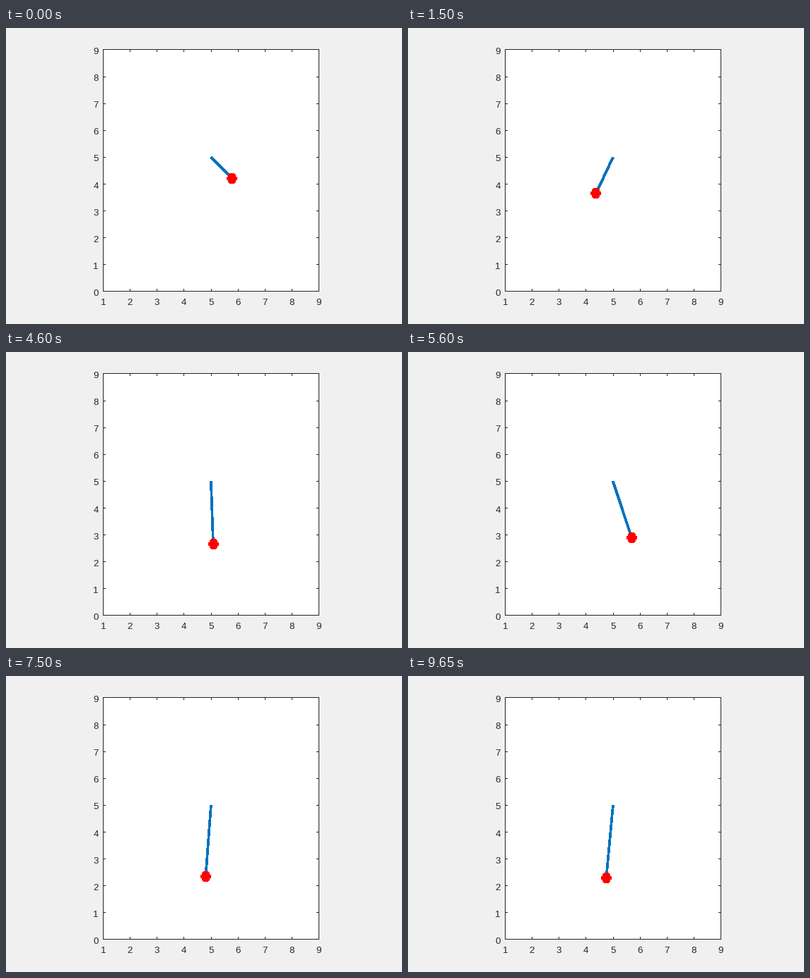
Animation of 560 by 420 pixels, one loop 9.7 s. Source, as a matplotlib script:

```python
import numpy as np
import matplotlib.pyplot as plt
from matplotlib.animation import FuncAnimation
from matplotlib.patches import Polygon, Rectangle

W, H, DPI = 560, 420, 100
PX = 72 / DPI                        # one pixel in points
FRAMES, INTERVAL = 194, 50

# Spring pendulum: unit mass, positions measured from the pivot, y downwards
G, K, REST = 9.81, 10.0, 1.0
START_LEN, START_ANGLE = 1.1, np.pi / 4
STEP, SUBSTEPS = 0.06013, 12

# Pixel columns and rows of the box outline
LEFT, RIGHT, TOP, BOTTOM = 137, 442, 30, 373
TICK = 3
UNIT = 38.03
PIVOT = np.array([289.9, 183.6])
INK, BLUE = "#262626", "#0072BD"


def rate(s):
    pull = K * (1 - REST / np.hypot(s[0], s[1]))
    return np.array([s[2], s[3], -pull * s[0], G - pull * s[1]])


def rk4(s, h):
    a = rate(s)
    b = rate(s + h / 2 * a)
    c = rate(s + h / 2 * b)
    d = rate(s + h * c)
    return s + h / 6 * (a + 2 * b + 2 * c + d)


def swing(count):
    s = np.array([START_LEN * np.sin(START_ANGLE),
                  START_LEN * np.cos(START_ANGLE), 0.0, 0.0])
    path = [s[:2]]
    for _ in range(count - 1):
        for _ in range(SUBSTEPS):
            s = rk4(s, STEP / SUBSTEPS)
        path.append(s[:2])
    return PIVOT + UNIT * np.array(path)


def bob_outline():
    quarter = np.array([(7.3, 0.8), (6.0, 2.4), (4.4, 2.7),
                        (4.7, 4.5), (3.8, 6.2), (1.5, 7.2)])
    half = np.vstack([quarter, quarter[::-1] * (-1, 1)])
    return np.vstack([half, -half])


def block(x, y, w, h, color=INK):
    """Fill whole pixels, so that thin lines stay crisp."""
    ax.add_patch(Rectangle((x, y), w, h, fc=color, ec="none", lw=0,
                           snap=False, zorder=1))


def draw_axes():
    width, height = RIGHT - LEFT + 1, BOTTOM - TOP + 1
    block(LEFT, TOP, width, height)
    block(LEFT + 1, TOP + 1, width - 2, height - 2, "white")

    font = dict(family="Liberation Sans", size=13.33 * PX, color=INK,
                va="baseline")
    for n, x in enumerate(np.linspace(LEFT, RIGHT, 9), 1):
        col = np.round(x)
        block(col, TOP, 1, TICK + 1)
        block(col, BOTTOM - TICK, 1, TICK + 1)
        ax.text(x + 0.3, 393, str(n), ha="center", **font)
    for n, y in enumerate(np.linspace(BOTTOM, TOP, 10)):
        if 0 < n < 9:
            row = np.floor(PIVOT[1] + UNIT * (5 - n))
            block(LEFT, row, TICK + 1, 1)
            block(RIGHT - TICK, row, TICK + 1, 1)
        ax.text(130.6, y + 7, str(n), ha="right", **font)


fig = plt.figure(figsize=(W / DPI, H / DPI), dpi=DPI, facecolor="#f0f0f0")
ax = fig.add_axes([0, 0, 1, 1])
ax.set_xlim(0, W)
ax.set_ylim(H, 0)
ax.axis("off")
draw_axes()

path = swing(FRAMES - 1)
shape = bob_outline()
rod, = ax.plot([], [], color=BLUE, lw=2.67 * PX, solid_capstyle="butt",
               antialiased=False, snap=False, zorder=3)
bob = ax.add_patch(Polygon(shape, fc="red", ec="none", lw=0,
                           antialiased=False, snap=False, zorder=4))


def update(i):
    x, y = path[max(i - 1, 0)]       # the opening pose is held for one extra frame
    rod.set_data([PIVOT[0], x], [PIVOT[1], y])
    bob.set_xy(shape + np.floor((x, y)) + 0.5)
    return rod, bob


anim = FuncAnimation(fig, update, frames=FRAMES, interval=INTERVAL,
                     repeat=True, repeat_delay=0)
plt.show()
```
